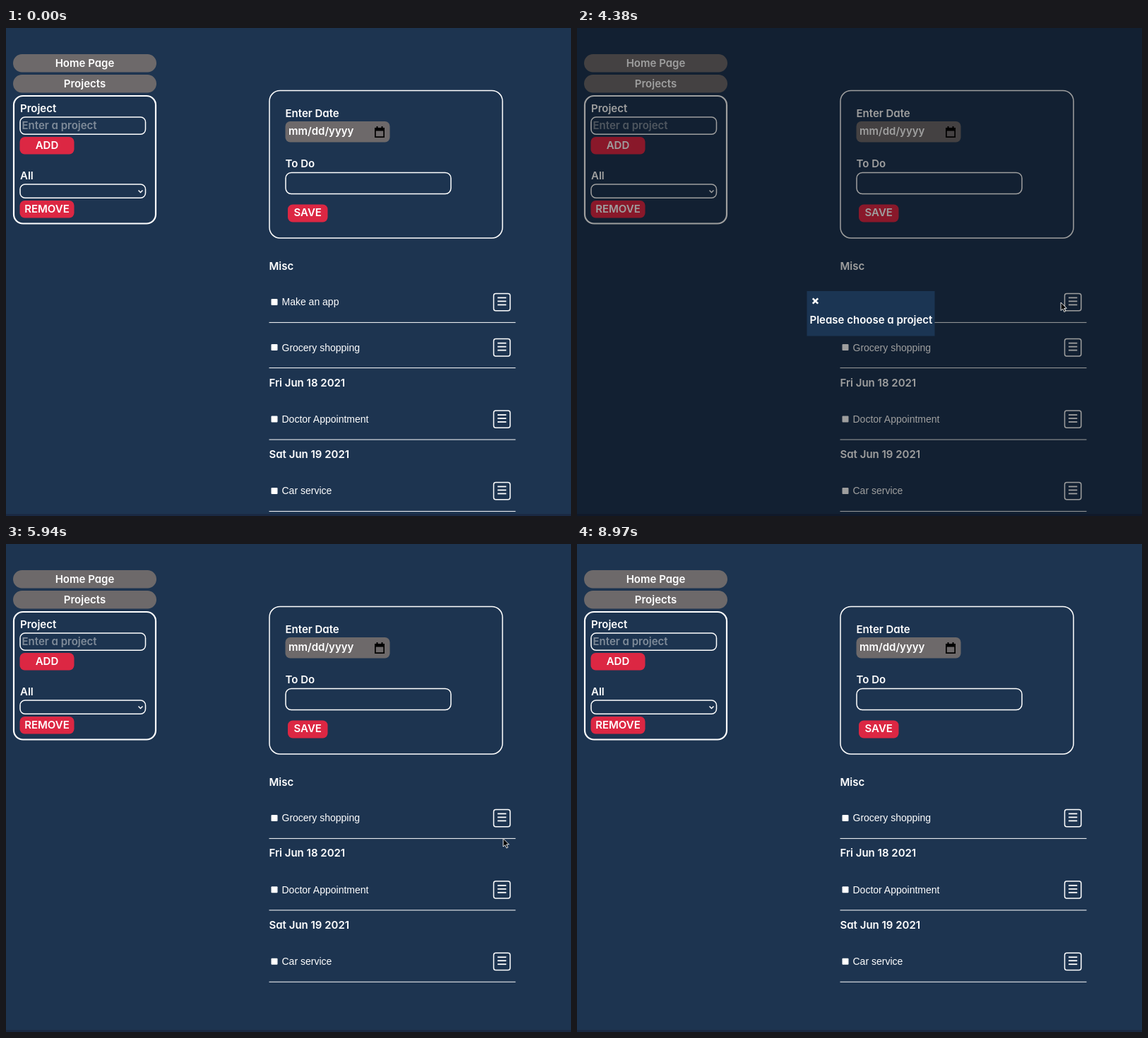
Recreate the animation shown at these times as an HTML page. Size 800 by 690 pixels, loop 9000 ms.

```html
<!DOCTYPE html>
<html lang="en">
<head>
<meta charset="utf-8">
<title>To-do list</title>
<style>
  html, body { margin: 0; width: 100%; height: 100%; overflow: hidden; background: #1d3450; }
  svg { display: block; }
  text { fill: #fff; font: 600 15px Inter, Lato, sans-serif; font-feature-settings: "cv11"; white-space: pre; }
  .task { font: 14px "Liberation Sans", Arial, sans-serif; }
  .mid { text-anchor: middle; }
  .line { fill: none; stroke: #fff; stroke-width: 1.5; }
  .grey { fill: #6d696a; }
  .red { fill: #dc2743; }
</style>
</head>
<body>
<svg width="800" height="690" viewBox="0 0 800 690">
  <rect width="800" height="690" fill="#1d3450"/>
  <rect y="687" width="800" height="3" fill="#1a2943"/>
  <g id="sidebar">
    <rect class="grey" x="10" y="37" width="203" height="25.5" rx="12.7"/>
    <text class="mid" x="111.5" y="55">Home Page</text>
    <rect class="grey" x="10" y="66" width="203" height="25.5" rx="12.7"/>
    <text class="mid" x="111.5" y="84">Projects</text>
    <rect class="line" x="11" y="96" width="201" height="180.5" rx="13" style="stroke-width:2.2"/>
    <text x="20" y="119">Project</text>
    <rect class="line" x="20" y="126" width="177.5" height="24.3" rx="7"/>
    <text x="22.5" y="142.5" style="fill:#7f8b99">Enter a project</text>
    <rect class="red" x="19.5" y="154" width="77" height="24.5" rx="7"/>
    <text class="mid" x="58" y="171">ADD</text>
    <text x="20" y="214">All</text>
    <rect class="line" x="20" y="221" width="177.5" height="19.3" rx="7"/>
    <path class="line" d="M187.5 229.5l3 3 3-3"/>
    <rect class="red" x="19.5" y="244" width="77" height="24.5" rx="7"/>
    <text class="mid" x="58" y="260.5">REMOVE</text>
  </g>
  <g id="form">
    <rect id="panel" class="line" x="373" y="88.5" width="330" height="208.5" rx="15"/>
    <text x="395.5" y="125.5">Enter Date</text>
    <rect class="grey" x="395.5" y="132" width="148" height="29.5" rx="7"/>
    <text x="400" y="151">mm/dd/yyyy</text>
    <path d="M522 141h2.5v-2h2v2h5v-2h2v2h2.5v14h-14zM523.7 145.5v7.8h10.6v-7.8z" fill-rule="evenodd"/>
    <text x="395.5" y="197">To Do</text>
    <rect class="line" x="396" y="204.5" width="234" height="30" rx="8"/>
    <rect class="red" x="399" y="249.5" width="56.5" height="25" rx="7"/>
    <text class="mid" x="427.2" y="266">SAVE</text>
  </g>
  <text x="372.5" y="341.5">Misc</text>
  <g id="list"></g>
  <g id="modal">
    <rect width="800" height="690" fill="#000" opacity=".38"/>
    <rect x="325.5" y="372" width="181" height="63.5" fill="#1b3553"/>
    <path d="M333.8 382.3l7.4 7.4m0-7.4l-7.4 7.4" stroke="#fff" stroke-width="2.6"/>
    <text x="329.5" y="418">Please choose a project</text>
  </g>
  <path id="arrow" d="M0 0v11.5l2.7-2.4 2 4.3 2-.9-2-4.2h3.6z" fill="#000" stroke="#fff" stroke-width=".9"/>
  <path id="hand" d="M-1.2 0q1.2-1 2.2 0l1.2 4.2 4.2 1.3q1.4.6 1.2 2.3l-.6 3.2H2L-1.8 7.6q-.3-1.4 1.7-.9z" fill="#fff" stroke="#223" stroke-width=".7"/>
</svg>
<script>
const LOOP = 9000;
const EDIT = [850, 2950], MODAL = [4300, 5000], CHECKED = [6850, 7250], REMOVED = 5700;
const ROW = 64.2, HEADING = 37.2, LIST_TOP = 352.2;

// Pointer trips: each eases from one spot to the next; [start, end, points x,y,x,y]
const TRIPS = [
  [120, 700, 755, 52, 430, 388],
  [700, 1200, 430, 388, 430, 388],
  [3480, 3950, 430, 392, 702, 388],
  [3950, 4330, 702, 388, 702, 388],
  [4330, 4720, 702, 388, 341, 388],
  [4720, 5020, 341, 388, 341, 388],
  [5020, 5450, 341, 388, 702, 388],
  [5450, 5720, 702, 388, 702, 388],
  [5720, 5900, 702, 388, 704, 416.5],
  [5900, 6200, 704, 416.5, 704, 416.5],
  [6200, 6750, 704, 416.5, 380, 390],
  [6750, 7270, 380, 390, 380, 390],
  [7270, 7430, 380, 390, 430, 438],
  [7430, 8150, 430, 438, 782, 438]
];

const $ = id => document.getElementById(id);
const within = (t, [a, b]) => t >= a && t < b;
const ruler = document.createElement("canvas").getContext("2d");
ruler.font = '14px "Liberation Sans", Arial, sans-serif';
const textWidth = s => ruler.measureText(s).width;

function pointerAt(t) {
  const trip = TRIPS.find(p => within(t, p));
  if (!trip) return null;
  const [a, b, x0, y0, x1, y1] = trip;
  const u = (t - a) / (b - a), k = u * u * (3 - 2 * u);
  return { x: x0 + (x1 - x0) * k, y: y0 + (y1 - y0) * k };
}

function firstTask(t) {
  if (t >= EDIT[1]) return "Make another app";
  if (t < 1850) {
    const erased = Math.max(0, Math.min(3, Math.floor((t - 1150) / 150)));
    return "Make an app".slice(0, 11 - erased);
  }
  return "Make an " .trimEnd() + "other app".slice(0, Math.floor((t - 1750) / 100));
}

const rect = (x, y, w, h, attrs) => `<rect x="${x}" y="${y}" width="${w}" height="${h}" ${attrs}/>`;
const rule = (x0, x1, y, color = "#fff", w = 1) =>
  `<path d="M${x0} ${y}H${x1}" stroke="${color}" stroke-width="${w}"/>`;
const label = (x, y, s, cls = "") => `<text class="${cls}" x="${x}" y="${y}">${s}</text>`;

function menuButton(x, y) {
  return rect(x, y - 12, 23.3, 24.3, 'rx="3" class="line"') +
    [-6, -1, 4].map(d => rule(x + 5.5, x + 17.8, y + d, "#fff", 1.8)).join("");
}

function checkbox(x, y, on) {
  return rect(x, y - 4.5, 9, 9, `rx="1" fill="${on ? "#5b90cf" : "#fff"}"`) +
    (on ? `<path d="M${x + 2} ${y}l2 2.3 3.3-5" fill="none" stroke="#fff" stroke-width="1.4"/>` : "");
}

function taskRow(text, bottom, right, { hover, edit, done }) {
  const dx = hover ? 2 : 0;
  const y = bottom - (edit ? 30.5 : 29);
  const buttonX = right - (hover ? 29 : 31) + dx;
  let out = checkbox(375.5 + dx, y, done) + menuButton(buttonX, y);
  if (hover) {
    out += rect(373.5, bottom - 58.5, 354, 58.5,
      'fill="none" stroke="#fff" stroke-width="2" stroke-dasharray="2.4 2.2"');
  } else {
    out += rule(372.5, right, bottom);
  }
  if (edit) {
    out += rect(387.8, y - 15, 300, 30, 'class="line"') + label(392, y + 5, text, "task");
    out += rect(392 + textWidth(text), y - 8, 1, 16, 'fill="#fff"');
  } else {
    out += label(390.5 + dx, y + 5, text, "task");
  }
  if (done) out += rule(392.5, 392.5 + textWidth(text), y + .3, "#e0263c", 2);
  return out;
}

function render(t) {
  const modal = within(t, MODAL), editing = within(t, EDIT);
  const pointer = pointerAt(t);
  const rows = [
    { text: firstTask(t), edit: editing, skip: t >= REMOVED },
    { text: "Grocery shopping", done: within(t, CHECKED) },
    { heading: "Fri Jun 18 2021" },
    { text: "Doctor Appointment" },
    { heading: "Sat Jun 19 2021" },
    { text: "Car service" }
  ].filter(r => !r.skip);

  let y = LIST_TOP;
  for (const r of rows) {
    y += r.heading ? HEADING : ROW;
    r.bottom = y;
    r.hover = !r.heading && !modal && !editing && pointer !== null &&
      pointer.x > 372 && pointer.x < 725 && pointer.y > y - 56 && pointer.y < y - 2;
  }
  const hovering = rows.some(r => r.hover);
  const widen = hovering ? 2.3 : editing ? 1.5 : 0;

  let shift = 0;
  $("list").innerHTML = rows.map(r => {
    if (r.heading) return label(372.5, r.bottom - HEADING + shift + 26, r.heading);
    if (r.hover) shift += 3.3;
    else if (r.edit) shift += 3;
    return taskRow(r.text, r.bottom + shift, 721.5 + widen, r);
  }).join("");

  $("panel").setAttribute("width", 330 + widen);
  $("modal").style.display = modal ? "" : "none";
  const overClose = modal && pointer && pointer.x < 350;
  for (const [id, shown] of [["arrow", pointer && !overClose], ["hand", overClose]]) {
    $(id).style.display = shown ? "" : "none";
    if (shown) $(id).setAttribute("transform", `translate(${pointer.x} ${pointer.y})`);
  }
}

const start = performance.now();
function tick() {
  render((performance.now() - start) % LOOP);
  requestAnimationFrame(tick);
}
tick();
</script>
</body>
</html>
```
